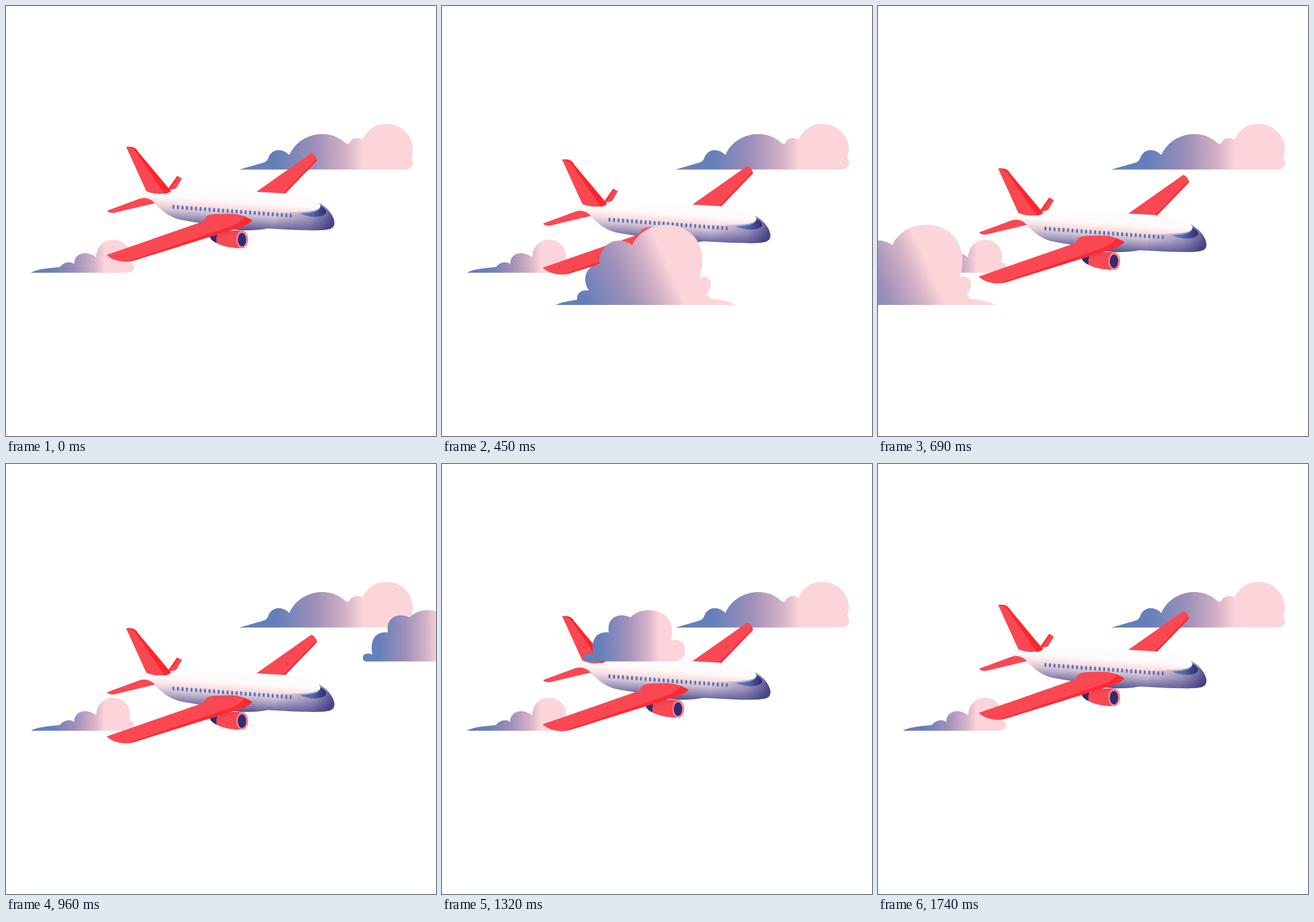
Recreate the animation shown at these times as an HTML page. Size 748 by 748 pixels, loop 1770 ms.

```html
<!DOCTYPE html>
<html lang="en">
<head>
<meta charset="utf-8">
<title>Plane among clouds</title>
<style>
  html, body { margin: 0; width: 100%; height: 100%; overflow: hidden; background: #fff; }
  svg { display: block; width: 100vw; height: 100vh; }
</style>
</head>
<body>
<svg viewBox="0 0 748 748">
  <defs>
    <linearGradient id="cloud">
      <stop offset="0" stop-color="#657fba"/>
      <stop offset=".45" stop-color="#9f90b9"/>
      <stop offset=".8" stop-color="#d5b2c6"/>
      <stop offset="1" stop-color="#fbd5d9"/>
    </linearGradient>
    <linearGradient id="farSky" href="#cloud" gradientUnits="userSpaceOnUse" x1="470" y1="0" x2="622" y2="0"/>
    <linearGradient id="lowSky" href="#cloud" gradientUnits="userSpaceOnUse" x1="78" y1="0" x2="172" y2="0"/>
    <linearGradient id="bigSky" href="#cloud" gradientUnits="userSpaceOnUse" x1="50" y1="506" x2="192" y2="443"/>
    <linearGradient id="smallSky" href="#cloud" gradientUnits="userSpaceOnUse" x1="28" y1="0" x2="132" y2="0"/>

    <linearGradient id="hull" gradientUnits="userSpaceOnUse" x1="400" y1="326" x2="395" y2="396">
      <stop offset="0" stop-color="#fdfcfd"/>
      <stop offset=".2" stop-color="#fdfafa"/>
      <stop offset=".36" stop-color="#fce0e2"/>
      <stop offset=".52" stop-color="#d5c2d3"/>
      <stop offset=".74" stop-color="#8582b0"/>
      <stop offset="1" stop-color="#34327a"/>
    </linearGradient>
    <linearGradient id="nose" gradientUnits="userSpaceOnUse" x1="470" y1="350" x2="565" y2="378">
      <stop offset="0" stop-color="#4b4d98" stop-opacity="0"/>
      <stop offset=".65" stop-color="#46488f" stop-opacity=".45"/>
      <stop offset="1" stop-color="#34327c" stop-opacity=".85"/>
    </linearGradient>
    <linearGradient id="glass">
      <stop offset="0" stop-color="#6283c3"/>
      <stop offset=".45" stop-color="#4d68b0"/>
      <stop offset="1" stop-color="#2c2a70"/>
    </linearGradient>
    <linearGradient id="engine" x1="0" y1="0" x2=".35" y2="1">
      <stop offset="0" stop-color="#c83f5c"/>
      <stop offset=".45" stop-color="#fa4853"/>
    </linearGradient>
  </defs>

  <path fill="url(#farSky)" d="M406 284.5 L446 273 Q454 271 456 265 C461 249 479 246 493 259
    C509 221 562 211 590 238 Q594 241 597 239 C600 230 612 226 620 233
    C628 215 643 205 661 205 C689 205 708 226 708 251 Q707 259 705 264 Q709 271 708 276 Q705 284.5 693 284.5 Z"/>
  <path fill="url(#lowSky)" d="M43 464 C55 457 76 456 94 454 C100 446 111 443 119 449
    C117 433 137 422 157 437 C158 418 170 406.500 186 406.500 C204 406.500 217 421 216 437
    Q216 442 214 446 C221 446 224 451 223 456 Q220 464 210 464 Z"/>

  <g id="plane">
    <g fill="#fa4853">
      <path d="M433 325 L531 256 Q538 258 541 268 L485 327 Z"/>
      <path d="M280 321 L298 295.500 L306 300 L296 317 L284 321 Z"/>
    </g>
    <path fill="#ff2a32" d="M540 266 L541 269 L485 327 L481 327 Z M280 321 L298 295.500 L300 297 L284 320 Z"/>

    <path fill="url(#hull)" d="M229 331 Q231 324 250 322 L290 319 C340 319 400 321 450 324
      C495 327 529 327 544 342 C559 350 569 363 571 374 Q573 385 563 388 C547 392 512 390 455 387
      C436 391 414 391 398 389 C368 381 328 377 300 371 C280 365 269 353 259 344 Q244 339 229 331 Z"/>
    <path fill="url(#nose)" d="M470 359 C510 358 547 360 547 347 L544 342 C559 350 569 363 571 374
      Q573 385 563 388 C547 392 512 390 470 388 Z"/>
    <path fill="url(#glass)" d="M511 361 C529 360 548 359 547 347 Q557 353 557 359 C553 369 528 369 511 361 Z"/>
    <g id="windows" fill="#5b78bb"></g>

    <path fill="#fa4853" d="M176 356 L233 335 C244 332 254 337 259 343 L187 360 Q178 360 176 356 Z"/>
    <path fill="#fa4853" d="M209 245 Q225 243 230 254 L287 322 C277 329 257 328 244 322 Z"/>
    <path fill="#ff252d" d="M209 245 Q225 243 230 254 L287 322 Q283 326 276 327 L224 251 Q219 246 209 245 Z"/>

    <path fill="#302d74" d="M354 401 L368 397 L368 413 Q357 409 354 401 Z"/>
    <path fill="url(#engine)" d="M366 403 Q369 388 411 390.500 L411 421 C393 422 373 417 366 412 Z"/>
    <ellipse cx="411" cy="406" rx="10.300" ry="15.500" fill="#fa858d"/>
    <ellipse cx="410.500" cy="406.500" rx="7.300" ry="11.800" fill="#302d74"/>

    <path fill="#fa4853" d="M175 433 L345 374 C345 360 366 362 386 361.500 C407 361 416 366 429 373
      Q422 381 401 387 L222 443 C205 448 186 443 175 433 Z"/>
    <path fill="#ff2a32" d="M415 366 Q422 369 429 373 Q422 381 401 387 L222 443 L210 445 L382 386 Q409 378 415 366 Z"/>
  </g>

  <path id="smallCloud" fill="url(#smallSky)" d="M7 343.500 C-2 343.500 -2 330 8 330 Q13 329 17 332
    C13 310 19 291 44 293 C40 268 60 257 82 267 C93 253 122 250 139 261 C153 270 157 289 152 307
    C167 303 177 311 177 324 C177 337 169 343.500 157 343.500 Z"/>
  <path id="bigCloud" fill="url(#bigSky)" d="M0 520 Q14 514 38 511 C37 499 46 493 59 495
    C46 479 51 451 77 450 C74 416 107 396 134 416 C145 393 167 380.500 192 380.500
    C232 380.500 256 408 256 442 Q256 457 251 472 C263 468 271 475 271 485 Q270 495 263 501
    Q268 504 268 509 C281 510 300 512 313 520 Z"/>
</svg>
<script>
  const LOOP = 1770, STEP = 30, BOB_PERIOD = 1740, BOB_HEIGHT = 42;
  const byId = id => document.getElementById(id);
  const plane = byId('plane'), bigCloud = byId('bigCloud'), smallCloud = byId('smallCloud');

  byId('windows').innerHTML = Array.from({ length: 27 }, (_, i) =>
    `<rect x="${289.5 + i * 7.85}" y="${346 + i * 0.58}" width="3.6" height="7" rx="1.6"/>`).join('');

  const move = (el, x, y) => el.setAttribute('transform', `translate(${x.toFixed(2)} ${y.toFixed(2)})`);

  function draw(t) {
    move(plane, 0, BOB_HEIGHT / 2 * (1 - Math.cos(2 * Math.PI * t / BOB_PERIOD)));
    move(bigCloud, 771 - 1.2755 * t, 0);
    move(smallCloud, 402 - 1.0394 * (t - 1170), 0);
  }

  const start = performance.now();
  function tick() {
    const t = (performance.now() - start) % LOOP;
    draw(Math.floor(t / STEP) * STEP);
    requestAnimationFrame(tick);
  }
  tick();
</script>
</body>
</html>
```
